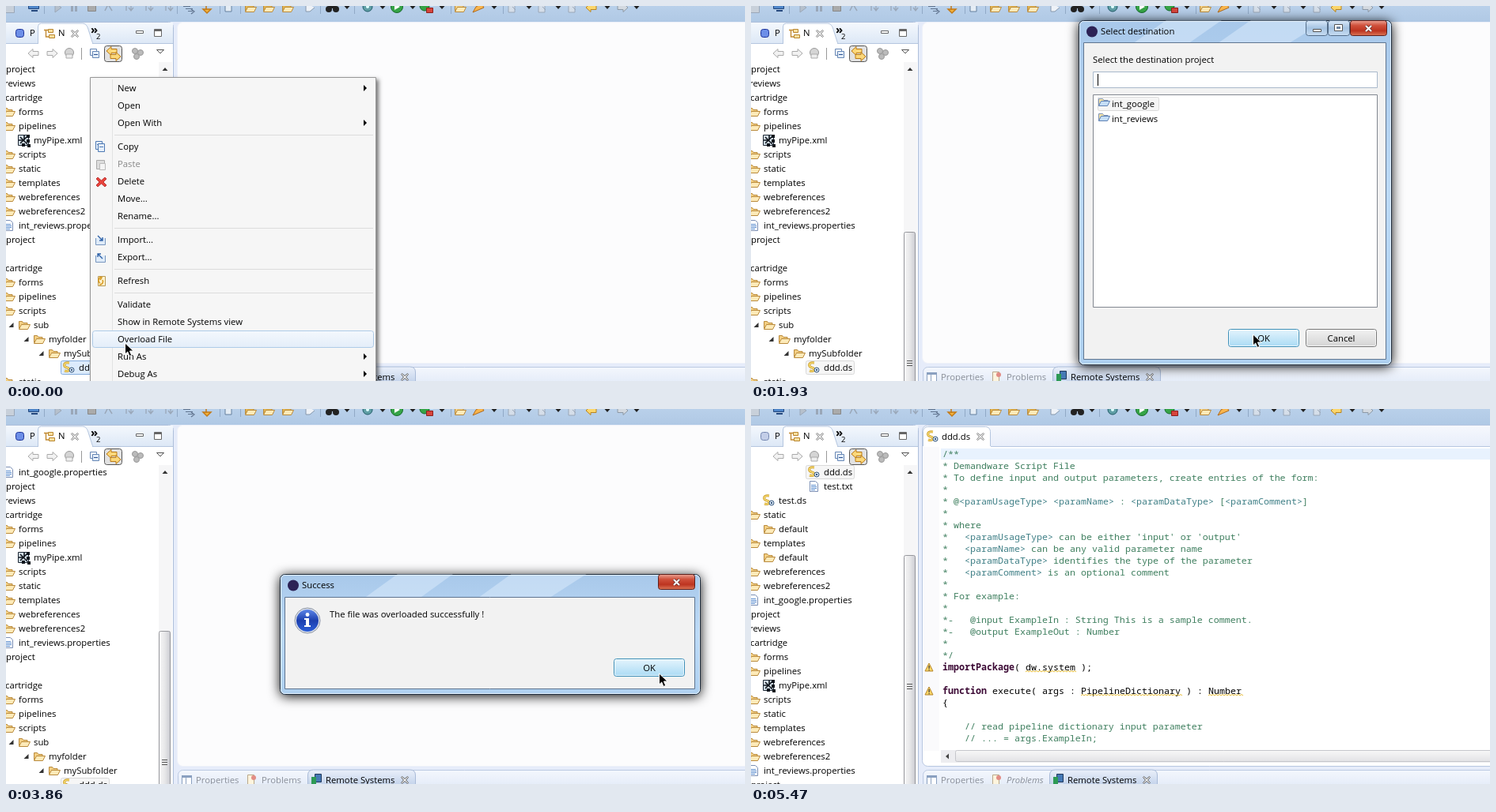
These frames come from a looping animation (934x475 px, 5590 ms). An HTML page with a canvas:

```html
<!DOCTYPE html>
<html lang="en">
<head>
<meta charset="utf-8">
<title>Overload file</title>
<style>
  html, body { margin: 0; width: 100%; height: 100%; overflow: hidden; background: #fcfcfd; }
  canvas { position: absolute; left: 0; top: 0; }
</style>
</head>
<body>
<script>
const W = 934, H = 475, LOOP = 5590;
const UI = '11.3px "Open Sans", "Noto Sans", sans-serif';
const ITALIC = 'italic ' + UI;
const MONO = '11.67px "Noto Sans Mono", "DejaVu Sans Mono", monospace';
let g;

function layer(origin) {
  const c = document.createElement('canvas');
  c.width = W;
  c.height = H;
  if (origin) c.style.transformOrigin = origin;
  document.body.append(c);
  return c.getContext('2d');
}

// ---- drawing helpers ----
function text(s, x, y, color = '#000', font = UI) {
  g.font = font;
  g.fillStyle = color;
  g.fillText(s, x, y + 4);
}
function center(s, x, y, color) {
  g.textAlign = 'center';
  text(s, x, y, color);
  g.textAlign = 'left';
}
function rect(x, y, w, h, fill) {
  g.fillStyle = fill;
  g.fillRect(x, y, w, h);
}
function box(x, y, w, h, fill, stroke, r = 0) {
  g.beginPath();
  g.roundRect(x + .5, y + .5, w - 1, h - 1, r);
  if (fill) { g.fillStyle = fill; g.fill(); }
  if (stroke) { g.strokeStyle = stroke; g.lineWidth = 1; g.stroke(); }
}
function path(x, y, d, fill, stroke, lw = 1) {
  const p = new Path2D(d);
  g.save();
  g.translate(x, y);
  if (fill) { g.fillStyle = fill; g.fill(p); }
  if (stroke) { g.strokeStyle = stroke; g.lineWidth = lw; g.stroke(p); }
  g.restore();
}
function disc(x, y, r, fill, stroke) {
  g.beginPath();
  g.arc(x, y, r, 0, 7);
  g.fillStyle = fill;
  g.fill();
  if (stroke) { g.strokeStyle = stroke; g.lineWidth = 1; g.stroke(); }
}
function shade(y0, y1, ...colors) {
  const s = g.createLinearGradient(0, y0, 0, y1);
  colors.forEach((c, i) => s.addColorStop(i / (colors.length - 1), c));
  return s;
}

// ---- icons, placed by left edge and vertical centre ----
const icon = {
  folder(x, y, back = '#f3cf83') {
    path(x, y - 8, 'M1.5 12.5v-9h4l1.5 2h5v2', back, '#b98a3c');
    path(x, y - 8, 'M1.5 13.5l3-6h11l-3 6z', '#fdeab8', '#b98a3c');
  },
  project(x, y) {
    path(x, y - 8, 'M1.5 12.5v-9h5l1.5 2h5v2', '#f6e4a5', '#7f93b5');
    path(x, y - 8, 'M1.5 12.5l3-6h11l-3 6z', '#c5def6', '#5f82b5');
  },
  file(x, y) {
    path(x, y - 8, 'M2.5 1.5h7l3 3v10h-10z', '#fff', '#7b8fb5');
    path(x, y - 8, 'M4 6.5h6M4 8.5h7M4 10.5h7M4 12.5h5', null, '#5d8fd0');
  },
  pipe(x, y) {
    box(x, y - 7, 14, 14, '#d3e0ea', '#1d2733');
    path(x, y - 7, 'M3 3l9 9M12 2l-9 9M1 7h6M8 1v6', null, '#10151c', 1.6);
    for (const [a, b] of [[11, 0], [11, 6], [5, 11], [12, 12]]) rect(x + a, y - 7 + b, 4, 4, '#10151c');
  },
  script(x, y) {
    path(x, y - 8, 'M8 2c-8-1-8 5-3 6s3 6-3 4', null, '#c99a20', 3);
    path(x, y - 8, 'M8 2c-8-1-8 5-3 6s3 6-3 4', null, '#f8dd7a', 1.4);
    disc(x + 11, y + 3, 3, '#dfe9f5', '#33567d');
    rect(x + 10, y + 2, 2, 2, '#33567d');
  },
  cross(x, y, c = '#777') {
    path(x - 5, y - 5, 'M1.5 .5l3.5 3 3.5-3 1 1-3 3.5 3 3.5-1 1-3.5-3-3.5 3-1-1 3-3.5-3-3.5z', '#fff', c);
  },
  warn(x, y) {
    path(x, y - 6, 'M6 1l5 10H1z', '#fbd768', '#b5852a');
    rect(x + 5.5, y - 2, 1.2, 4, '#333');
    rect(x + 5.5, y + 3, 1.2, 1.2, '#333');
  },
  drop(x, y) { path(x, y, 'M-3.5-2h7l-3.5 4z', '#222'); },
  arrow(x, y, dir, fill, line) {
    g.save();
    g.translate(x, y);
    g.scale(dir, 1);
    path(0, 0, 'M-7 0l6-5.5v3h7v5h-7v3z', fill, line);
    g.restore();
  }
};

// ---- workbench ----
function toolbar() {
  rect(0, 0, W, 20, shade(0, 20, '#b9d0ea', '#b0c9e5'));
  const gray = '#9aa7b8';
  for (const x of [48, 216, 270, 296, 397, 440, 562, 628]) rect(x, 0, 1, 10, '#91a9c6');
  box(-4, -6, 15, 15, '#c8d0da', gray);
  box(28, -8, 14, 12, '#4f86c9', '#24477c');
  rect(32, 5, 8, 2, '#24477c');
  path(59, -4, 'M3 0l8 6-8 6z', '#b6c0cc', gray);
  rect(82, -2, 3, 9, gray);
  rect(87, -2, 3, 9, gray);
  box(103, -3, 11, 10, '#aaa', '#888');
  path(125, -2, 'M0 8l4-8M4 0l5 8', null, gray, 1.5);
  for (const x of [152, 177, 202]) path(x, -2, 'M0 8V0h6v7M3 4l3 4 3-4', null, gray, 1.3);
  path(224, 0, 'M0 .5h9M3 3.5h9M6 6.5h6M10 4l4 3-4 3', null, '#60748f', 1.2);
  path(248, -2, 'M5 0v7M1 6l5 5 5-5z', '#f3b33c', '#c37a17', 1.5);
  path(276, -3, 'M1 0v10h8V2', '#e5edf5', '#65809f');
  for (const x of [301, 324, 348]) icon.folder(x, 2, '#e2b450');
  path(378, -4, 'M1 0v11h5l6-5', '#eef2f7', '#8697ac');
  disc(408, 4, 4, '#222');
  disc(417, 4, 4, '#222');
  rect(408, -2, 9, 5, '#222');
  disc(457, 1, 6, '#5f9ea5', '#1f5a66');
  disc(457, 1, 2, '#dff');
  disc(494, 1, 7.5, '#36a447', '#176a2a');
  path(491, -3, 'M0 0l7 4-7 4z', '#fff');
  disc(529, 0, 6, '#36a447', '#176a2a');
  box(531, 2, 9, 7, '#d6453c', '#8d1f1c');
  icon.folder(566, 2);
  path(590, -2, 'M0 10l4-7 7-4 3 5-7 3z', '#f8b54d', '#b06a1c');
  for (const x of [634, 672, 710]) path(x, -3, 'M1 0v11h8V0M6 4l4 4', '#d5dee9', gray);
  icon.arrow(740, 2, 1, '#fbd66c', '#b88420');
  icon.arrow(779, 2, -1, '#d3d9e0', '#8c98a6');
  for (const x of [431, 476, 514, 551, 617, 661, 698, 760, 797]) icon.drop(x, 2);
}

const TREE = ['ddd.ds|92|script', 'test.txt|92|file', 'test.ds|35|script', 'static|16|folder', 'default|35|folder',
  'templates|16|folder', 'default|35|folder', 'webreferences|16|folder', 'webreferences2|16|folder',
  'int_google.properties|16|file', 'project|0', 'reviews|-2', 'cartridge|-1', 'forms|16|folder', 'pipelines|16|folder',
  'myPipe.xml|35|pipe', 'scripts|16|folder', 'static|16|folder', 'templates|16|folder', 'webreferences|16|folder',
  'webreferences2|16|folder', 'int_reviews.properties|16|file', 'project|0', '|0', 'cartridge|-1', 'forms|16|folder',
  'pipelines|16|folder', 'scripts|16|folder', 'sub|35|folder|1', 'myfolder|54|folder|1', 'mySubfolder|73|folder|1',
  'ddd.ds|92|script', 'static|16|folder'].map(s => s.split('|'));

function navigator(s) {
  box(-8, 20, 220, 470, '#fff', '#aebfda', 6);
  rect(0, 21, 211, 26, shade(21, 47, '#f4f8fd', '#dde8f6'));
  path(0, 0, 'M40.5 47V26q0-4 4-4h52q5 0 7 6l6 19z', '#fff', '#b5c6df');
  rect(41, 46, 68, 3, '#fff');
  rect(0, 47, 41, 1, '#b5c6df');
  rect(109, 47, 102, 1, '#b5c6df');
  box(12, 29, 11, 11, s.editor ? '#c3cee8' : '#6d8fe8', s.editor ? '#7486b0' : '#1c3298', 3);
  text('P', 30, 34);
  path(47, 27, 'M1 3.5h6M3.5 4v8H7', null, '#c2892f', 1.4);
  box(53, 29, 7, 5, '#fbe0a0', '#b8862f');
  box(54, 36, 8, 5, '#fbe0a0', '#b8862f');
  text('N', 66, 34);
  icon.cross(87, 35);
  text('»', 107, 31, '#000', 'bold 15px "Open Sans", sans-serif');
  text('2', 114, 38, '#000', '9.5px "Open Sans", sans-serif');
  box(164, 31, 10, 4, '#fff', '#666');
  box(187, 29, 10, 10, '#fff', '#666');
  rect(187, 30, 10, 2, '#666');

  icon.arrow(35, 60, 1, '#f2f2f2', '#aaa');
  icon.arrow(58, 60, -1, '#f2f2f2', '#aaa');
  disc(80, 59, 5.5, '#d5d5d5', '#999');
  path(76, 57, 'M0 4h8v5h-8z', '#eee', '#aaa');
  rect(95, 53, 1, 15, '#999');
  box(106, 54, 9, 9, '#fff', '#6586b5');
  box(109, 57, 9, 9, '#e4eefa', '#6586b5');
  rect(111, 61, 5, 1, '#274d8f');
  box(124, 50, 23, 21, '#e2e2e2', '#555', 3);
  icon.arrow(134, 57, 1, '#fbd87b', '#bb7a14');
  icon.arrow(138, 64, -1, '#fbd87b', '#bb7a14');
  disc(163, 57, 3.5, '#bbb', '#999');
  disc(170, 59, 3.5, '#bbb', '#999');
  disc(165, 64, 3.5, '#bbb', '#999');
  path(195, 58, 'M-4.5-2.5h9l-4.5 4.5z', '#fff', '#555');

  TREE.slice(s.row, s.row + 23).forEach(([name, x, kind, open], i) => {
    const y = 80 + i * 18;
    x = +x;
    if (name === 'ddd.ds')
      box(69, y - 9, 62, 18, s.focus ? '#dcebfc' : '#f6f6f6', s.focus ? '#84acdd' : '#d9d9d9', 2);
    if (kind) icon[kind](x - 20, y);
    if (open) path(x - 31, y - 3, 'M5.5 0v6h-6z', '#333');
    text(name, x, y);
  });

  rect(193, 71, 17, 404, '#f6f6f7');
  path(201, 80, 'M-3.5 2l3.5-4 3.5 4z', '#333');
  const top = { 10: 286, 9: 281, 0: 185 }[s.row];
  const face = g.createLinearGradient(194, 0, 208, 0);
  face.addColorStop(0, '#f7f7f7');
  face.addColorStop(.5, '#e6e6e8');
  face.addColorStop(1, '#c9cad0');
  box(193, top, 15, 330, face, '#96979c', 2);
  for (let i = 0; i < 3; i++) rect(197, top + 163 + i * 3, 7, 1, '#555');
}

const CODE = `/**
* Demandware Script File
* To define input and output parameters, create entries of the form:
*
* @<paramUsageType> <paramName> : <paramDataType> [<paramComment>]
*
* where
*   <paramUsageType> can be either 'input' or 'output'
*   <paramName> can be any valid parameter name
*   <paramDataType> identifies the type of the parameter
*   <paramComment> is an optional comment
*
* For example:
*
*-   @input ExampleIn : String This is a sample comment.
*-   @output ExampleOut : Number
*
*/
importPackage( dw.system );

function execute( args : PipelineDictionary ) : Number
{

    // read pipeline dictionary input parameter
    // ... = args.ExampleIn;`.split('\n');

function codeLine(line, y) {
  const comment = /^(\/?\*|\s*\/\/)/.test(line);
  let x = 242;
  for (const part of line.split(/(<\w+>|importPackage|function|dw\.system|PipelineDictionary|Number)/)) {
    const key = !comment && /^(importPackage|function)$/.test(part);
    const color = comment ? (part[0] === '<' ? '#3f7f86' : '#3f7f5f') : key ? '#3c0a35' : '#000';
    text(part, x, y, color, (key ? 'bold ' : '') + MONO);
    const w = part.length * 7;
    if (!comment && /^(dw|Pipe|Num)/.test(part)) {
      let d = `M${x} ${y + 6}`;
      for (let i = 0; i < w / 4; i++) d += 'l2-1.5 2 1.5';
      path(0, 0, d, null, '#e8bd38');
    }
    x += w;
  }
}

function editor(s) {
  box(216, 20, 740, 433, s.editor ? '#fff' : '#fcfcfd', s.editor ? '#b7c6e0' : '#eef1f9', 7);
  if (!s.editor) return;
  rect(222, 21, W, 26, shade(21, 47, '#f6f8fd', '#e8eefa'));
  rect(218, 47, W, 1, '#b7c6e0');
  box(217, 22, 86, 32, '#fff', '#b5c6df', 6);
  rect(217, 47, 86, 8, '#fff');
  icon.script(222, 35);
  text('ddd.ds', 241, 35);
  icon.cross(290, 35);
  rect(218, 48, 20, 385, '#fafafc');
  rect(240, 50, W, 14, '#e8f2fe');
  CODE.forEach((line, i) => codeLine(line, 57 + i * 15));
  icon.warn(219, 327);
  icon.warn(219, 357);
  rect(240, 432, W, 16, '#ededf0');
  box(258, 432, 720, 15, shade(432, 447, '#f8f8f8', '#e2e2e5'), '#c5c6cb', 2);
  path(248, 440, 'M2-3.5v7l-4-3.5z', '#444');
}

function bottomTabs(s) {
  box(217, 457, 760, 40, shade(457, 475, '#f4f7fd', '#e6edf9'), '#bccae2', 6);
  const x = s.italic ? 377 : 381;
  const w = 137, gray = '#8a8f98';
  box(222, 464, 13, 12, '#fff', '#8aa0c0');
  rect(222, 464, 13, 3, '#8aa0c0');
  rect(227, 464, 1, 12, '#8aa0c0');
  text('Properties', 240, 470, gray);
  box(305, 463, 9, 13, '#fdf4dd', '#b9a88a');
  disc(313, 467, 3, '#e28d85');
  text('Problems', 323, 470, gray, s.italic ? ITALIC : UI);
  path(x, 457, `M.5 20V7q0-7 7-7h${w - 15}q7 0 7 7v13z`, shade(0, 18, '#eaf0fa', '#c6d5ec'), '#a9bbd8');
  box(x + 9, 462, 9, 11, '#4579b5', '#22395c');
  rect(x + 5, 466, 6, 9, '#2d9a55');
  text('Remote Systems', x + 23, 470);
  icon.cross(x + 123, 470, '#555');
}

// ---- context menu ----
const MENU = [[104, 'New', 1], [126, 'Open'], [148, 'Open With', 1], [178, 'Copy'], [200, 'Paste'], [222, 'Delete'],
  [244, 'Move...'], [266, 'Rename...'], [296, 'Import...'], [318, 'Export...'], [348, 'Refresh'], [378, 'Validate'],
  [400, 'Show in Remote Systems view'], [422, 'Overload File'], [444, 'Run As', 1], [466, 'Debug As', 1]];

function menuHot() {
  box(109, 411, 356, 22, shade(411, 433, '#f4f8fd', '#e3edf9'), '#aecbe8', 3);
  text('Overload File', 141, 422);
}
function menu() {
  g.save();
  g.shadowColor = '#0008';
  g.shadowBlur = 5;
  g.shadowOffsetX = g.shadowOffsetY = 3;
  rect(106, 90, 362, 400, '#f5f5f5');
  g.restore();
  box(106, 90, 362, 400, '#f6f6f6', '#979797');
  rect(134, 93, 1, 382, '#e2e3e3');
  for (const y of [163, 281, 333, 363]) rect(137, y, 327, 1, '#dcdcdc');
  menuHot();
  for (const [y, name, sub] of MENU) {
    if (y !== 422) text(name, 141, y, name === 'Paste' ? '#888' : '#000');
    if (sub) path(452, y, 'M0-4l4 4-4 4z', '#000');
  }
  for (const o of [0, 3]) {
    box(113 + o, 171 + o, 9, 11, '#e7f0fb', '#4d79b3');
    rect(115 + o, 175 + o, 5, 1, '#4d79b3');
  }
  box(114, 195, 11, 12, '#ddd', '#aaa');
  box(118, 199, 8, 9, '#f4f4f4', '#bbb');
  path(114, 216, 'M2 1l4.5 4 4.5-4 2 2-4 4 4 4-2 2-4.5-4-4.5 4-2-2 4-4-4-4z', '#e8443c', '#b01f1f', .8);
  for (const [y, d] of [[290, 'M2 1l6 6M8 3v4H4'], [312, 'M8 8L2 2M2 6V2h4']]) {
    path(113, y, 'M.5 4v8.5h12V4', '#dfebf8', '#7896bf');
    path(114, y, d, null, '#2f62a8', 1.4);
  }
  box(116, 342, 10, 13, '#fff4d2', '#b99a55');
  path(113, 343, 'M6 1a4 4 0 0 0 0 7M5 0l3 1-2 3M5 10a4 4 0 0 0 4-6', null, '#d79a22', 1.6);
}

// ---- dialogs ----
function button(x, y, label, state) {
  const faces = {
    off: ['#f7f7f7', '#f7f7f7', '#b5b9bd'],
    plain: ['#f3f3f3', '#d3d3d3', '#777'],
    main: ['#eef4f8', '#cfdde6', '#3aa7d8'],
    hot: ['#e6f5fd', '#a9daf4', '#3c8fb8'],
    down: ['#e8f4fc', '#b2d8f0', '#3f76a0']
  };
  const [a, b, line] = faces[state];
  box(x, y, 90, 23, shade(y, y + 23, a, b), line, 3);
  if (state === 'main') box(x + 1, y + 1, 88, 21, null, '#6ad0f5', 2);
  else box(x + 1, y + 1, 88, 21, null, '#fffb', 2);
  center(label, x + 45, y + 12, state === 'off' ? '#8a8a8a' : '#000');
}
function closeButton(x, y) {
  box(x, y, 47, 20, shade(y, y + 20, '#eda99b', '#d0513c', '#bd3420', '#dd7c5c'), '#5f1f1b', 3);
  path(x + 19, y + 6, 'M1 1l7 7M8 1l-7 7', null, '#5d2a2a', 3.6);
  path(x + 19, y + 6, 'M1 1l7 7M8 1l-7 7', null, '#fff', 2.2);
}

const GLASS = {
  live: { face: ['#a8c8ea', '#bcdaf6', '#aed0f0'], edge: '#1d2b3c', rim: '#e5f2fd', streak: '#d5e8fa99', client: '#f2f2f2' },
  dim: { face: ['#a9b8c9', '#bfccd9', '#a7b5c3'], edge: '#39424d', rim: '#d5dfe9', streak: '#c3d4e566', client: '#fafafb' }
};

function frame(x, y, w, h, title, bar, dim) {
  const look = dim ? GLASS.dim : GLASS.live;
  g.save();
  g.shadowColor = '#000';
  g.shadowBlur = dim ? 17 : 15;
  g.shadowOffsetY = 2;
  box(x, y, w, h, look.face[0], null, 6);
  g.restore();
  box(x, y, w, h, shade(y, y + h, ...look.face), look.edge, 6);
  g.save();
  g.clip();
  path(x, y, `M${w * .28} 0h70l-40 ${bar}h-70zM${w * .55} 0h95l-45 ${bar}h-90z`, look.streak);
  g.restore();
  box(x + 1, y + 1, w - 2, h - 2, null, look.rim, 5);
  box(x + 6, y + bar, w - 13, h - bar - 7, look.client, '#5f7590');
  disc(x + 17, y + 14.5, 7, '#2c2255');
  text(title, x + 28, y + 14);
}

function chooser(s, dim) {
  frame(414, 18, 396, 437, 'Select destination', 28, dim);
  const glass = shade(18, 38, ...(dim ? ['#d5dde6', '#b2bfcd', '#c8d2dd'] : ['#dcebfa', '#a5c3e2', '#c9def3']));
  for (const x of [701, 729]) box(x, 18, 28, 20, glass, '#536c88', 3);
  box(710, 29, 11, 4, '#fff', '#555');
  box(737, 23, 11, 9, '#fff', '#555');
  rect(740, 26, 5, 3, '#6f86a0');
  closeButton(757, 18);
  text('Select the destination project', 432, 68);
  box(432, 83, 360, 21, '#fff', '#a9b9cb');
  if (s.caret) rect(438, 86, 1, 15, '#000');
  box(432, 112, 360, 270, '#fff', '#828790');
  box(438, 115, 78, 18, '#f5f5f5', '#dadada', 2);
  icon.project(438, 122);
  icon.project(438, 141);
  text('int_google', 456, 124);
  text('int_reviews', 456, 143);
  button(603, 409, 'OK', s.ok);
  button(701, 409, 'Cancel', 'plain');
}

function success(s, dim) {
  frame(346, 209, 532, 153, 'Success', 29, dim);
  closeButton(824, 209);
  disc(381, 268, 16, '#dfe3ea', '#8a93a3');
  disc(381, 268, 14, shade(254, 282, '#5d86e8', '#1c3fae', '#2c5fd8'));
  disc(381, 260.5, 2.4, '#fff');
  path(376, 265, 'M1 0h6v9h2v2H1V9h2V2H1z', '#fff');
  text('The file was overloaded successfully !', 409, 260);
  button(768, 316, 'OK', s.done);
}

// ---- pointer ----
function pointer([, x, y, busy]) {
  if (busy) {
    for (let i = 0; i < 6; i++) {
      g.beginPath();
      g.moveTo(x, y);
      g.arc(x, y, 10.5, i * Math.PI / 3 + busy, (i + 1) * Math.PI / 3 + busy);
      g.fillStyle = `hsl(${i * 60} 75% 45%)`;
      g.fill();
    }
    disc(x - 2, y - 4, 4, '#ffffff55');
  } else {
    path(x, y, 'M.5 0v14l3.2-3 2.3 5.5 2.7-1.2-2.3-5.3h4.6z', '#000', '#fff', 1);
  }
}

// ---- timeline ----
const POINTER = [[0, 150, 427], [120, 154, 426], [240, 161, 424], [360, 168, 421], [490, 173, 419], [610, 175, 418],
  [1110, 190, 418], [1230, 235, 420], [1350, 300, 422], [1450, 359, 423], [1570, 450, 422], [1690, 550, 419],
  [1810, 620, 417], [1930, 634, 416], [2170, 640, 419], [2290, 644, 421], [2770, 645, 421], [3370, 660, 415],
  [3490, 705, 392], [3610, 765, 362], [3740, 810, 341], [3860, 825, 335], [3980, 828, 334],
  [4340, 838, 335.5, .2], [4460, 838, 335.5, .5], [4560, 838, 335.5, .8], [4790, 855, 368, 1.1],
  [4890, 882, 425, 1.4], [4990, 903, 469, 1.7], [5140, -50, -50]];

const tilt = (dy, deg, k) => `translateY(${dy}px) perspective(1000px) rotateX(${deg}deg) scale(${k})`;
const CHOOSER = [[0, 0, 'none'], [990, .65, tilt(-3.5, -4.3, .95)], [1110, .95, tilt(-1, -1, .99)], [1230, 1, 'none'],
  [2530, .93, tilt(1, 1.1, .983)], [2650, 0, 'none']];
const SUCCESS = [[0, 0, 'none'], [2650, .5, tilt(-2, -4, .95)], [2770, 1, 'none'],
  [4560, .93, tilt(.5, 1.1, .987)], [4790, 0, 'none']];

const pick = (rows, t) => rows.findLast(r => r[0] <= t);
const within = (t, a, b) => t >= a && t < b;

const base = layer(), dlg1 = layer('612px 236px'), dlg2 = layer('612px 285px'), top2 = layer();

function stateAt(t) {
  return {
    menu: t < 850,
    ghost: within(t, 850, 990) ? .7 : within(t, 990, 1110) ? .35 : 0,
    focus: t < 990,
    row: t < 2410 ? 10 : t < 5370 ? 9 : 0,
    editor: t >= 5370,
    italic: within(t, 2770, 3370) || t >= 5370,
    faded: within(t, 4560, 5370),
    caret: !within(t, 1570, 1930) && t < 2050,
    ok: t < 1110 ? 'off' : t < 1810 ? 'main' : t < 2290 ? 'hot' : 'down',
    done: t < 3860 ? 'main' : t < 4100 ? 'hot' : 'down',
    chooser: pick(CHOOSER, t),
    success: pick(SUCCESS, t),
    pointer: pick(POINTER, t)
  };
}

function show(ctx, [, alpha, move], draw, s) {
  g = ctx;
  g.clearRect(0, 0, W, H);
  g.canvas.style.opacity = alpha;
  g.canvas.style.transform = move;
  if (alpha) draw(s, alpha < 1);
}

function render(s) {
  g = base;
  rect(0, 0, W, H, '#e6ecfa');
  toolbar();
  navigator(s);
  editor(s);
  if (s.faded) rect(217, 440, 679, 17, '#fcfcfd');
  bottomTabs(s);
  if (s.menu) menu();
  if (s.ghost) {
    g.globalAlpha = s.ghost;
    menuHot();
    g.globalAlpha = 1;
  }
  show(dlg1, s.chooser, chooser, s);
  show(dlg2, s.success, success, s);
  g = top2;
  g.clearRect(0, 0, W, H);
  pointer(s.pointer);
}

let last = '';
const start = performance.now();
function tick() {
  const s = stateAt((performance.now() - start) % LOOP);
  const key = JSON.stringify(s);
  if (key !== last) {
    last = key;
    render(s);
  }
  requestAnimationFrame(tick);
}
tick();
</script>
</body>
</html>
```
